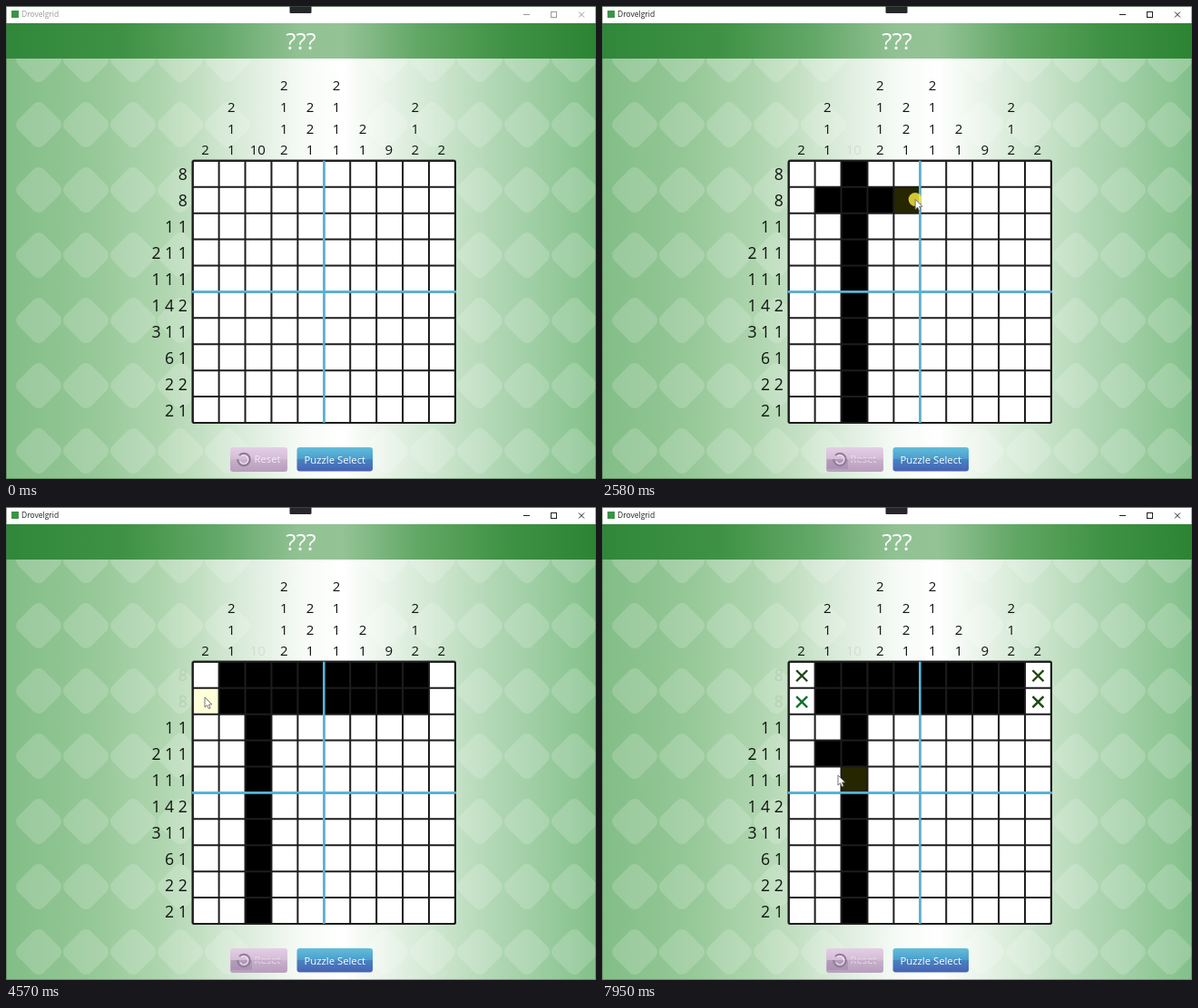
Write an HTML page with a canvas that moves like this. It is 650x522 px and loops after 8000 ms.

```html
<!DOCTYPE html>
<html lang="en">
<head>
<meta charset="utf-8">
<title>Nonogram</title>
<style>
html, body { margin: 0; width: 100%; height: 100%; overflow: hidden; background: #fff; }
canvas { display: block; }
</style>
</head>
<body>
<canvas id="stage" width="650" height="522"></canvas>
<script>
const ctx = document.getElementById('stage').getContext('2d');
const W = 650, H = 522, LOOP = 8000;
const LEFT = 205.7, TOP = 170.8, PITCH = 28.92, SIZE = 10;
const FONT = '"Open Sans", "Noto Sans", sans-serif';
const ACTIVATE = 1130, HOVER_LAG = 45;

const columnClues = ['2', '2 1 1', '10', '2 1 1 2', '2 2 1', '2 1 1 1', '2 1', '9', '2 1 2', '2'];
const rowClues = ['8', '8', '1 1', '2 1 1', '1 1 1', '1 4 2', '3 1 1', '6 1', '2 2', '2 1'];

// Pointer stops: time, x, y, and whether the way there is at even speed.
const path = [
  [160, 616, 505], [900, 281, 240], [1580, 281, 240], [1760, 250, 211],
  [2220, 250, 211], [2960, 445, 216, true], [3070, 446, 216], [3210, 447, 187],
  [3260, 447, 187], [3350, 431, 187, true], [3860, 266, 187, true], [4010, 254, 187, true],
  [4150, 254, 187], [4560, 219, 210], [4970, 219, 210], [5140, 218, 187],
  [5860, 218, 187], [6660, 255, 278], [6720, 255, 279], [6950, 252, 276],
  [7200, 252, 276], [7480, 335, 244], [7710, 335, 244], [7950, 260, 296]
];
const presses = [[1130, 1360], [2230, 2990], [3240, 3980], [7120, 7220]];
const marks = [[0, 1, 4700], [9, 1, 4850], [0, 0, 5200], [9, 0, 5600]];

const clamp = v => Math.max(0, Math.min(1, v));
const smooth = k => k * k * (3 - 2 * k);

function pointer(t) {
  if (t < path[0][0]) return null;
  const next = path.findIndex(p => p[0] > t);
  if (next < 0) return path[path.length - 1].slice(1, 3);
  const a = path[next - 1], b = path[next];
  let k = (t - a[0]) / (b[0] - a[0]);
  if (!b[3]) k = smooth(k);
  return [a[1] + (b[1] - a[1]) * k, a[2] + (b[2] - a[2]) * k];
}

function hoveredCell(t) {
  const p = pointer(t - HOVER_LAG);
  if (!p) return null;
  const col = Math.floor((p[0] - LEFT) / PITCH);
  const row = Math.floor((p[1] - TOP) / PITCH);
  return col >= 0 && col < SIZE && row >= 0 && row < SIZE ? [col, row] : null;
}

// Time at which each cell turns black.
const fills = new Map();
for (let row = 0; row < SIZE; row++) fills.set('2,' + row, ACTIVATE);
for (const [from, to] of presses.slice(1)) {
  for (let t = from; t <= to; t += 5) {
    const key = String(hoveredCell(t));
    if (!fills.has(key)) fills.set(key, t);
  }
}
const columnDone = { 2: ACTIVATE };
const rowDone = { 0: fills.get('1,0'), 1: fills.get('8,1') };

function text(str, x, y, size, color, align = 'center') {
  ctx.font = size + 'px ' + FONT;
  ctx.textAlign = align;
  ctx.fillStyle = color;
  ctx.fillText(str, x, y + size * 0.357);
}

function line(x1, y1, x2, y2, color, width) {
  ctx.strokeStyle = color;
  ctx.lineWidth = width;
  ctx.beginPath();
  ctx.moveTo(x1, y1);
  ctx.lineTo(x2, y2);
  ctx.stroke();
}

function cross(x, y, r, color, width) {
  line(x - r, y - r, x + r, y + r, color, width);
  line(x - r, y + r, x + r, y - r, color, width);
}

function gradient(x2, y1, y2, ...stops) {
  const g = ctx.createLinearGradient(0, y1, x2, y2);
  stops.forEach(([at, color]) => g.addColorStop(at, color));
  return g;
}

function roundBox(x, y, w, h, r, fill) {
  ctx.fillStyle = fill;
  ctx.beginPath();
  ctx.roundRect(x, y, w, h, r);
  ctx.fill();
}

function diamond(x, y) {
  ctx.save();
  ctx.translate(x, y);
  ctx.rotate(Math.PI / 4);
  roundBox(-20, -20, 40, 40, 8, 'rgba(255,255,255,0.17)');
  ctx.restore();
}

function drawBackground() {
  ctx.fillStyle = gradient(W, 0, 0, [0, '#82bd86'], [0.15, '#96c898'], [0.27, '#b0d6b0'],
    [0.4, '#daebda'], [0.5, '#f6faf6'], [0.57, '#ffffff'], [0.68, '#deeede'],
    [0.82, '#b3d8b6'], [1, '#83c08a']);
  ctx.fillRect(0, 0, W, H);
  for (let i = 0; i < 5; i++) {
    for (let y = 23 - (i % 2) * 36; y < H + 40; y += 72) {
      diamond(36 + i * 52, y + (i % 2 ? 0 : 36));
      diamond(626 - i * 52, y + (i % 2 ? 0 : 36));
    }
  }
  ctx.fillStyle = gradient(W, 0, 0, [0, '#30873a'], [0.2, '#3f9245'], [0.36, '#63a868'],
    [0.5, '#92c294'], [0.57, '#94c396'], [0.7, '#62a765'], [0.85, '#3f9244'], [1, '#2c8433']);
  ctx.fillRect(0, 19, W, 39);
  text('???', 325, 39, 26, '#fff');
}

function drawTitleBar(active) {
  const ink = active ? '#202020' : '#999';
  ctx.fillStyle = '#fff';
  ctx.fillRect(0, 0, W, 19);
  ctx.fillStyle = '#8a948a';
  ctx.fillRect(0, 0, W, 1);
  roundBox(312.5, -2, 24, 10, 1, '#25272b');
  ctx.fillStyle = '#3b9447';
  ctx.fillRect(6, 5, 8, 8);
  text('Drovelgrid', 17, 9.3, 8.5, ink, 'left');
  line(570, 9.5, 577, 9.5, ink, 1);
  ctx.strokeRect(600.5, 6.5, 6, 6);
  cross(634, 9.5, 3, ink, 1);
}

function drawButtons(active) {
  roundBox(247, 487, 63, 27, 3, gradient(0, 487, 514, [0, '#e4cfe5'], [0.48, '#d3bcd6'], [0.52, '#c8afcc'], [1, '#b69fbc']));
  if (active) {
    ctx.fillStyle = 'rgba(146,122,156,0.4)';
    ctx.fillRect(248, 500, 23, 11);
  }
  ctx.strokeStyle = active ? '#8f7d98' : '#87798f';
  ctx.lineWidth = 2;
  ctx.beginPath();
  ctx.arc(262, 500.5, 6.8, -2.4, 3.2);
  ctx.stroke();
  ctx.strokeStyle = '#eee4f0';
  ctx.lineWidth = 1.3;
  ctx.beginPath();
  ctx.arc(262, 500.5, 4.6, -2.2, 2.7);
  ctx.stroke();
  text('Reset', 288, 500.5, 11.2, active ? '#e9dcea' : '#f4ebf5');
  if (active) line(272, 500.5, 303, 500.5, 'rgba(190,165,195,0.75)', 1.5);

  roundBox(320.5, 487, 83.5, 26.5, 3, gradient(0, 487, 513, [0, '#62bddb'], [0.48, '#4c9ecc'], [0.52, '#4584c0'], [1, '#4a62b4']));
  text('Puzzle Select', 362.3, 500.5, 11.3, '#fff');
}

function clueColor(doneAt, t) {
  const k = doneAt === undefined ? 0 : clamp((t - doneAt) / 80);
  return `rgba(16,20,16,${1 - 0.92 * k})`;
}

function drawClues(t) {
  columnClues.forEach((clue, col) => {
    clue.split(' ').reverse().forEach((n, i) => {
      text(n, LEFT + (col + 0.5) * PITCH - 0.7, 159 - i * 23.7, 15, clueColor(columnDone[col], t));
    });
  });
  rowClues.forEach((clue, row) => {
    text(clue, 199.7, TOP + (row + 0.5) * PITCH + 0.8, 17.6, clueColor(rowDone[row], t), 'right');
  });
}

function markColor(col, row, t) {
  if (col === 0 && row === 1) return t < 6000 ? '#10180a' : t < 6800 ? '#1c4a14' : '#127030';
  return t < 5800 ? '#20651c' : '#1f4712';
}

function drawGrid(t) {
  const span = PITCH * SIZE;
  ctx.fillStyle = '#fff';
  ctx.fillRect(LEFT, TOP, span, span);
  const paintCell = (col, row, color) => {
    ctx.fillStyle = color;
    ctx.fillRect(LEFT + col * PITCH, TOP + row * PITCH, PITCH, PITCH);
  };
  for (const [key, at] of fills) {
    if (t >= at) paintCell(...key.split(',').map(Number), '#000');
  }
  const hover = hoveredCell(t);
  if (hover) paintCell(...hover, 'rgba(255,255,0,0.15)');

  for (let i = 0; i <= SIZE; i++) {
    const x = LEFT + i * PITCH, y = TOP + i * PITCH;
    line(x, TOP, x, TOP + span, '#1d1d1d', 2);
    line(LEFT, y, LEFT + span, y, '#1d1d1d', 2);
  }
  ctx.lineWidth = 2;
  ctx.beginPath();
  ctx.roundRect(LEFT, TOP, span, span, 2);
  ctx.stroke();
  line(LEFT + span / 2, TOP, LEFT + span / 2, TOP + span, '#58b4d6', 2.6);
  line(LEFT - 1, TOP + span / 2, LEFT + span + 1, TOP + span / 2, '#58b4d6', 2.6);

  for (const [col, row, at] of marks) {
    if (t < at) continue;
    ctx.globalAlpha = clamp((t - at + 30) / 90);
    cross(LEFT + (col + 0.5) * PITCH, TOP + (row + 0.5) * PITCH + 1, 6, markColor(col, row, t), 2.4);
    ctx.globalAlpha = 1;
  }
}

function drawPointer(t) {
  const p = pointer(t);
  if (!p) return;
  if (presses.some(([from, to]) => t >= from && t < to)) {
    ctx.fillStyle = 'rgba(255,240,70,0.8)';
    ctx.beginPath();
    ctx.arc(p[0], p[1], 7.5, 0, Math.PI * 2);
    ctx.fill();
  }
  ctx.save();
  ctx.translate(p[0], p[1]);
  ctx.beginPath();
  [[0, 0], [0, 11], [2.6, 8.7], [4.4, 12.6], [6.2, 11.8], [4.5, 8], [7.8, 7.8]]
    .forEach(([x, y]) => ctx.lineTo(x, y));
  ctx.closePath();
  ctx.fillStyle = '#fff';
  ctx.fill();
  ctx.strokeStyle = '#666';
  ctx.lineWidth = 0.9;
  ctx.stroke();
  ctx.restore();
}

function draw(t) {
  const active = t >= ACTIVATE;
  drawBackground();
  drawTitleBar(active);
  drawButtons(active);
  drawClues(t);
  drawGrid(t);
  ctx.strokeStyle = 'rgba(70,100,70,0.5)';
  ctx.lineWidth = 1;
  ctx.strokeRect(0.5, 0.5, W - 1, H - 1);
  drawPointer(t);
}

const start = performance.now();
function tick() {
  draw((performance.now() - start) % LOOP);
  requestAnimationFrame(tick);
}
tick();
</script>
</body>
</html>
```
